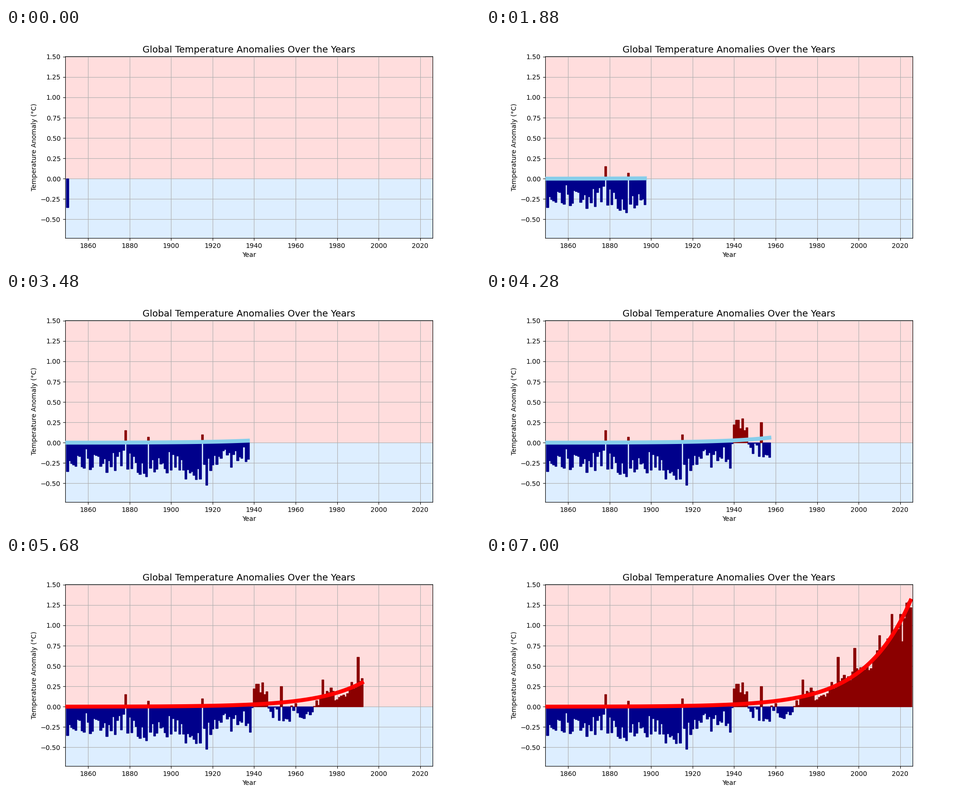
These frames come from a looping animation (1000x500 px, 8000 ms). A matplotlib script:

```python
import numpy as np
import matplotlib.pyplot as plt
from matplotlib.animation import FuncAnimation

FIRST, LAST = 1850, 2025
INTERVAL = 40
FRAMES = 200
BOTTOM, TOP = -0.73, 1.505

# Broad temperature level up to 1977; later years scatter around the trend
LEVELS = [(1850, -0.35), (1855, -0.12), (1862, -0.28), (1877, -0.20),
          (1882, -0.17), (1885, -0.34), (1900, -0.22), (1909, -0.42),
          (1920, -0.24), (1938, -0.17), (1940, 0.20), (1945, 0.21),
          (1948, -0.04), (1956, -0.16), (1960, 0.05), (1965, -0.16),
          (1972, 0.08), (1977, 0.20)]

# Years that stand out
PEAKS = {1850: -0.35, 1878: 0.15, 1889: 0.07, 1915: 0.10, 1917: -0.52,
         1953: 0.25, 1973: 0.33, 1990: 0.61, 1998: 0.72, 2010: 0.88,
         2016: 1.14, 2020: 1.14, 2021: 0.80, 2025: 1.22}

years = np.arange(FIRST, LAST + 1)
trend = 0.000496 * np.exp(0.045 * (years - FIRST))


def make_anomalies():
    rng = np.random.default_rng(5)
    level = np.where(years <= 1977, np.interp(years, *zip(*LEVELS)), trend)
    spread = np.where(years < 1940, 0.14, 0.09)
    values = level + spread * rng.uniform(-1, 1, len(years))
    for year, value in PEAKS.items():
        values[year - FIRST] = value
    return values


anomaly = make_anomalies()

fig, ax = plt.subplots(figsize=(10, 5), dpi=100)
ax.set_xlim(FIRST - 1, LAST + 1)
ax.set_ylim(BOTTOM, TOP)
ax.axhspan(0, TOP, facecolor="#ffdddd", edgecolor="none", zorder=0)
ax.axhspan(BOTTOM, 0, facecolor="#ddeeff", edgecolor="none", zorder=0)
ax.grid(True)
ax.set_title("Global Temperature Anomalies Over the Years", fontsize=14)
ax.set_xlabel("Year")
ax.set_ylabel("Temperature Anomaly (°C)")

colors = np.where(anomaly > 0, "darkred", "darkblue")
bars = ax.bar(years, anomaly, width=1, color=colors, edgecolor=colors,
              linewidth=1, zorder=2)
curve, = ax.plot([], [], linewidth=6, solid_capstyle="projecting", zorder=3)


def draw(frame):
    last = min(frame, len(years) - 1)
    for i, bar in enumerate(bars):
        bar.set_visible(i <= last)
    shown = last + 1 if last > 0 else 0
    curve.set_data(years[:shown], trend[:shown])
    curve.set_color("red" if trend[last] > 0.1 else "skyblue")
    return [*bars, curve]


def reset():
    return draw(0)


anim = FuncAnimation(fig, draw, frames=FRAMES, init_func=reset,
                     interval=INTERVAL, repeat=True, repeat_delay=0)
plt.show()
```
